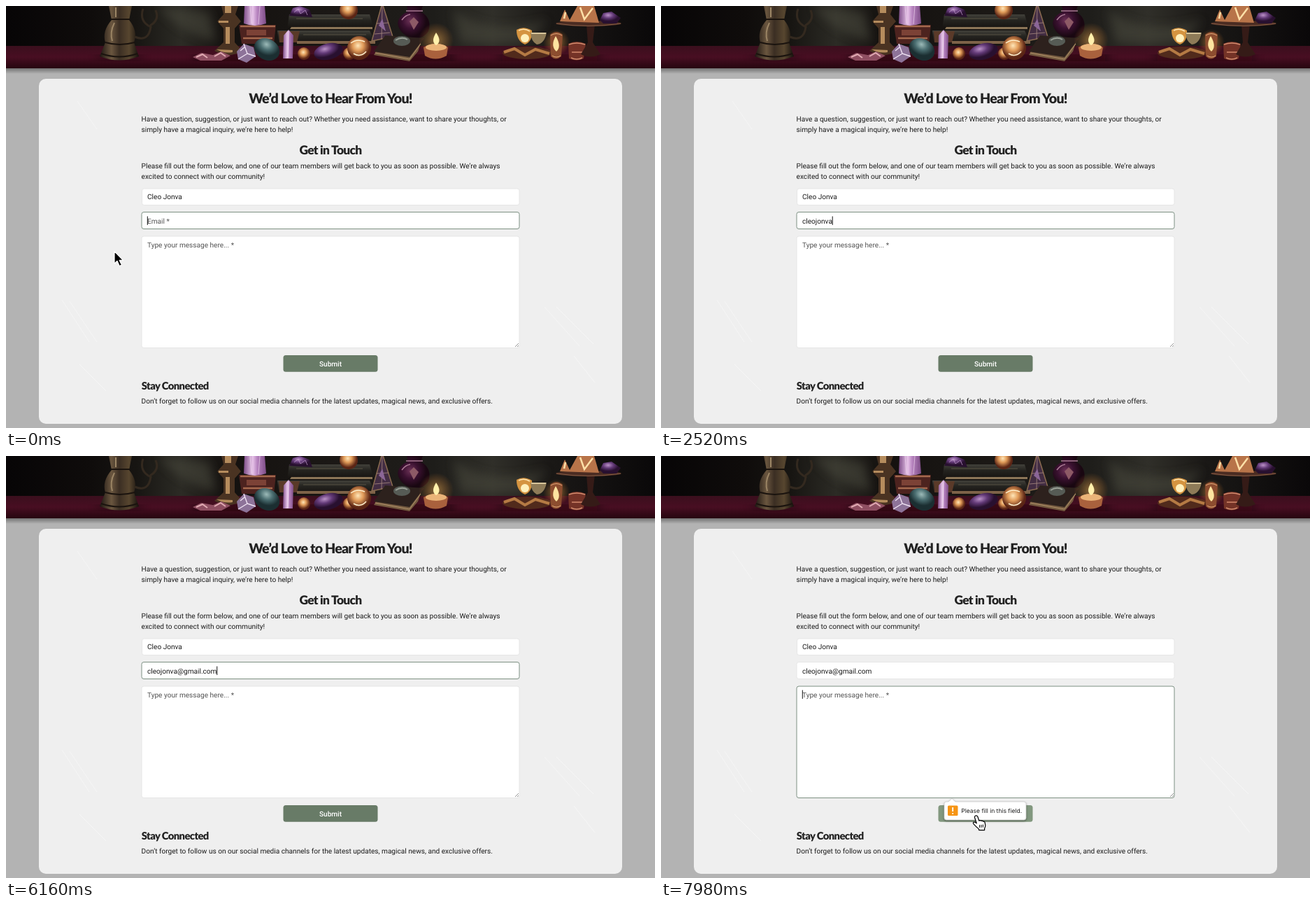
An HTML page for the animation above (8 s loop, 928x603 px).

```html
<!DOCTYPE html>
<html lang="en">
<head>
<meta charset="utf-8">
<title>Contact form</title>
<style>
  html, body { margin: 0; width: 100%; height: 100%; overflow: hidden; background: #b3b3b3; }
  svg { display: block; width: 100vw; height: 100vh; }
  text { font: 10.1px Roboto, sans-serif; fill: #1c1c1c; text-rendering: geometricPrecision; white-space: pre; }
  .head { font-family: Lato, sans-serif; font-weight: 900; letter-spacing: -.04em; fill: #222; }
  .mid { text-anchor: middle; }
  .hint { fill: #555; }
  .field { fill: #fff; stroke: #e6e6e6; stroke-width: 1; }
  .field.on { stroke: #7d9082; }
</style>
</head>
<body>
<svg viewBox="0 0 928 603" preserveAspectRatio="none">
  <defs>
    <linearGradient id="wall">
      <stop offset="0" stop-color="#070506"/><stop offset=".13" stop-color="#0f0c0b"/>
      <stop offset=".2" stop-color="#171512"/><stop offset=".27" stop-color="#2c2b25"/>
      <stop offset=".34" stop-color="#14110f"/><stop offset=".55" stop-color="#1d1a17"/>
      <stop offset=".66" stop-color="#1e1d1a"/><stop offset=".75" stop-color="#302f29"/>
      <stop offset=".84" stop-color="#1a1816"/><stop offset="1" stop-color="#0a0809"/>
    </linearGradient>
    <linearGradient id="table" x2="0" y2="1">
      <stop offset="0" stop-color="#3a0f1d"/><stop offset=".5" stop-color="#480e22"/><stop offset="1" stop-color="#26060f"/>
    </linearGradient>
    <linearGradient id="metal">
      <stop offset="0" stop-color="#1d1612"/><stop offset=".3" stop-color="#6a563f"/>
      <stop offset=".5" stop-color="#3b2e23"/><stop offset=".75" stop-color="#57462f"/><stop offset="1" stop-color="#15100d"/>
    </linearGradient>
    <linearGradient id="pink">
      <stop offset="0" stop-color="#7d4d88"/><stop offset=".4" stop-color="#e7c3e8"/>
      <stop offset=".6" stop-color="#b784bf"/><stop offset="1" stop-color="#7d4c86"/>
    </linearGradient>
    <linearGradient id="cover" x2="0" y2="1">
      <stop offset="0" stop-color="#42413a"/><stop offset=".4" stop-color="#252420"/><stop offset="1" stop-color="#15110f"/>
    </linearGradient>
    <radialGradient id="amber" cx=".45" cy=".4">
      <stop offset="0" stop-color="#ffe6b8"/><stop offset=".45" stop-color="#e09a58"/><stop offset="1" stop-color="#5b2515"/>
    </radialGradient>
    <radialGradient id="violet" cx=".4" cy=".3">
      <stop offset="0" stop-color="#bb92c8"/><stop offset=".5" stop-color="#633a78"/><stop offset="1" stop-color="#28102f"/>
    </radialGradient>
    <radialGradient id="teal" cx=".4" cy=".3">
      <stop offset="0" stop-color="#9cbab8"/><stop offset=".5" stop-color="#4a6d70"/><stop offset="1" stop-color="#1b2e31"/>
    </radialGradient>
    <radialGradient id="vase" cx=".4" cy=".45">
      <stop offset="0" stop-color="#6d3257"/><stop offset=".5" stop-color="#3a1130"/><stop offset="1" stop-color="#190711"/>
    </radialGradient>
    <radialGradient id="glow">
      <stop offset="0" stop-color="#ffbf60" stop-opacity=".5"/><stop offset="1" stop-color="#ff9030" stop-opacity="0"/>
    </radialGradient>
    <linearGradient id="shade" x2="0" y2="1">
      <stop offset="0" stop-color="#000" stop-opacity=".36"/><stop offset="1" stop-color="#000" stop-opacity="0"/>
    </linearGradient>
    <filter id="soft" x="-20%" y="-40%" width="140%" height="200%">
      <feDropShadow dx="0" dy="1.5" stdDeviation="1.8" flood-opacity=".4"/>
    </filter>
    <filter id="fold"><feGaussianBlur stdDeviation="7"/></filter>
    <filter id="haze"><feGaussianBlur stdDeviation=".55"/></filter>
    <clipPath id="crop"><rect width="928" height="89"/></clipPath>
  </defs>

  <rect width="928" height="603" fill="#b3b3b3"/>
  <rect y="89" width="928" height="8" fill="url(#shade)"/>

  <g id="banner" clip-path="url(#crop)">
    <rect width="928" height="57" fill="url(#wall)"/>
    <path d="M218 0Q245 38 300 50L290 10ZM640 5Q690 45 775 20L740 52H650Z" fill="#4a483d" opacity=".55" filter="url(#fold)"/>
    <rect y="57" width="928" height="32" fill="url(#table)"/>
    <path d="M270 78H640V70H270ZM705 76H850V70H705ZM130 74H195V70H130Z" fill="#12040a" opacity=".8" filter="url(#fold)"/>

    <g filter="url(#haze)">
      <!-- pitcher -->
      <path d="M184 44Q204 52 207 30Q190 22 196 4M206 28Q220 20 214 6" fill="none" stroke="#33291f" stroke-width="3"/>
      <path d="M147 0H180L176 20Q189 36 183 52L190 72Q162 83 134 72L142 52Q137 36 151 20Z" fill="url(#metal)"/>
      <path d="M150 19H177M142 52Q162 58 184 52M136 68Q162 77 188 68" stroke="#1a130e" stroke-width="2" fill="none"/>
      <path d="M155 24Q148 38 152 50M157 2V16" stroke="#9b8565" stroke-width="2" fill="none"/>

      <!-- candlestick, box and crystal -->
      <path d="M308 0H332L328 12L336 22L327 32V52L338 64Q318 76 298 64L311 52V32L302 22L311 12Z" fill="#4a3322"/>
      <path d="M313 0H322V10H313ZM314 30H320V54H314ZM304 21H318V24H304ZM301 62Q312 68 324 66V63Z" fill="#b58c5d"/>
      <path d="M333 27H386L383 54H337Z" fill="#4d231f"/>
      <path d="M335 29H385M339 46H381" stroke="#a5694e" stroke-width="2.5"/>
      <path d="M344 34H372V42H344Z" fill="#7c4236"/>
      <path d="M341 0H370L372 25Q356 31 340 25Z" fill="url(#pink)"/>
      <path d="M349 0L351 25M363 0L361 26" stroke="#f5def3" opacity=".6"/>

      <!-- books -->
      <path d="M405 12H520L526 33H402Z" fill="url(#cover)"/>
      <path d="M408 30H524V33H406Z" fill="#8b7557"/>
      <path d="M388 35H520L529 55H390Z" fill="url(#cover)"/>
      <path d="M390 36H420L416 52H391Z" fill="#5a3a29"/>
      <path d="M416 50H528V54H416Z" fill="#7d6248"/>
      <path d="M415 18H510M425 41H515" stroke="#6d6450" opacity=".7"/>
      <path d="M405 14L410 3L420 0L434 5L438 16Z" fill="url(#violet)"/>
      <path d="M412 9L418 4L421 11L428 6L431 13" stroke="#c8a2d2" fill="none" opacity=".7"/>
      <circle cx="490" cy="6" r="13" fill="url(#amber)"/>

      <!-- pyramid and vase -->
      <path d="M538 -4L553 44L523 50Z" fill="#432d43" stroke="#8b6c50" stroke-width="1.5"/>
      <path d="M538 0L537 47M530 25L547 24M527 40L549 38" stroke="#a98a80" stroke-width=".8"/>
      <path d="M533 28L538 18L543 36Z" fill="#8b6697"/>
      <path d="M573 0H596L593 8Q610 18 604 36Q598 47 582 46Q562 41 560 24Q562 13 575 8Z" fill="url(#vase)"/>
      <path d="M572 7H596M566 20Q571 13 578 12" stroke="#a97893" stroke-width="1.6" fill="none"/>
      <path d="M577 22L583 16L590 23L583 34Z" fill="#8d5a66"/>

      <!-- gems -->
      <path d="M267 73L279 67L296 70L308 65L321 71L308 78H278Z" fill="#8f4f62"/>
      <path d="M272 73L281 69L288 74M298 72L307 67L314 72" stroke="#e1abb3" stroke-width="2" fill="none"/>
      <path d="M330 65L340 54L354 59L357 72L344 81L332 76Z" fill="#8d7399"/>
      <path d="M340 54L345 68L357 72M345 68L332 76M335 64L341 59" stroke="#f0e3f3" fill="none" stroke-width="1.4"/>
      <ellipse cx="373" cy="62" rx="19" ry="15" transform="rotate(28 373 62)" fill="url(#teal)"/>
      <path d="M397 42L404 34L411 42L410 75H396Z" fill="url(#pink)"/>
      <path d="M404 36L403 74" stroke="#f5e3f2"/>
      <circle cx="426" cy="68" r="9" fill="url(#amber)"/>
      <ellipse cx="461" cy="65" rx="21" ry="11.5" transform="rotate(-13 461 65)" fill="url(#violet)"/>
      <circle cx="491" cy="68" r="9" fill="url(#amber)"/>
      <circle cx="505" cy="60" r="17" fill="url(#amber)"/>
      <path d="M493 53Q502 46 513 51M497 68Q507 74 515 65" stroke="#fff0ce" stroke-width="1.5" fill="none"/>

      <!-- open book and candle -->
      <path d="M541 43L595 47L589 65L577 79L526 70Z" fill="#745a40"/>
      <path d="M542 42L598 46L577 73L526 65Z" fill="#2d211d"/>
      <path d="M528 67L577 76L593 54" stroke="#b4956c" fill="none"/>
      <ellipse cx="566" cy="50" rx="12" ry="7" fill="#565b55"/>
      <path d="M557 49Q566 43 574 48" stroke="#9aa096" stroke-width="2" fill="none"/>
      <circle cx="615" cy="49" r="25" fill="url(#glow)"/>
      <path d="M597 59Q615 49 632 59L630 71Q614 80 599 71Z" fill="#a9613d"/>
      <ellipse cx="615" cy="59" rx="15" ry="5" fill="#eab478"/>
      <path d="M615 38Q624 51 615 56Q607 51 615 38Z" fill="#fff0ac"/>

      <!-- tray, glasses and stand -->
      <ellipse cx="745" cy="67" rx="35" ry="9" fill="#512a1c"/>
      <path d="M712 66L727 61L742 70L757 62L777 68" stroke="#b57a44" stroke-width="4" fill="none"/>
      <path d="M730 34Q740 28 752 35Q753 51 742 55Q730 50 730 34Z" fill="#d59440"/>
      <circle cx="742" cy="46" r="6" fill="#fff0bb"/>
      <path d="M733 35Q741 31 749 36" stroke="#ffe5b0" stroke-width="1.5" fill="none"/>
      <path d="M750 38H773Q770 54 759 55Q751 51 750 38Z" fill="#8e7b58"/>
      <path d="M751 39H772" stroke="#d8c59a" stroke-width="2"/>
      <circle cx="787" cy="52" r="19" fill="url(#glow)"/>
      <path d="M778 41Q787 33 796 41L794 72Q786 79 779 72Z" fill="#8c4d2f"/>
      <path d="M779 42Q787 37 795 42M781 71Q787 75 793 71" stroke="#e1a878" fill="none"/>
      <path d="M786 43Q795 58 787 65Q778 57 786 43Z" fill="#ffe4a0"/>
      <path d="M804 54Q816 48 829 54L826 75Q816 80 805 75Z" fill="#743327"/>
      <path d="M805 55Q816 51 828 55M809 66H824M808 74Q816 78 824 74" stroke="#d28b6e" stroke-width="1.6" fill="none"/>
      <path d="M830 26H842L839 52L850 69Q835 76 822 69L832 52Z" fill="#351b17"/>
      <ellipse cx="833" cy="25" rx="47" ry="4" fill="#4b2c22"/>
      <path d="M787 25Q833 32 879 25" stroke="#875d45" fill="none"/>
      <path d="M792 22L799 5L806 20L817 0H841L848 24Z" fill="#b87449"/>
      <path d="M821 2L827 19L839 3M798 18L800 9" stroke="#ffe0a8" stroke-width="2.5" fill="none"/>
      <path d="M849 20L854 10L866 8L879 17L873 25H854Z" fill="url(#violet)"/>
    </g>
  </g>

  <rect x="47" y="104" width="834" height="493" rx="10" fill="#efefef"/>
  <path d="M102 136L130 176M80 420L119 480M91 422L130 480M105 512L143 550M770 430L820 486M787 430L840 483M812 500L842 538"
    fill="none" stroke="#f6f6f6"/>

  <text class="head mid" x="464" y="139" style="font-size:19.6px">We’d Love to Hear From You!</text>
  <text x="193.6" y="164.7">Have a question, suggestion, or just want to reach out? Whether you need assistance, want to share your thoughts, or</text>
  <text x="193.6" y="180">simply have a magical inquiry, we’re here to help!</text>
  <text class="head mid" x="464" y="211.5" style="font-size:17.4px">Get in Touch</text>
  <text x="193.6" y="231.7">Please fill out the form below, and one of our team members will get back to you as soon as possible. We’re always</text>
  <text x="193.6" y="247">excited to connect with our community!</text>

  <rect class="field" x="194.5" y="261" width="539.5" height="23.5" rx="3"/>
  <text x="202" y="276.4">Cleo Jonva</text>
  <rect class="field" id="mailBox" x="194" y="294.5" width="540" height="24" rx="3"/>
  <text class="hint" id="mailHint" x="202" y="310.5">Email *</text>
  <text id="mail" x="202" y="310.5"></text>
  <rect class="field" id="noteBox" x="194" y="329" width="540" height="159.5" rx="3"/>
  <text class="hint" x="202" y="344.6">Type your message here... *</text>
  <path d="M728 487L733 482M731 487L733 485" stroke="#777" stroke-width=".8"/>
  <rect id="caret" width="1" height="12.4" fill="#111"/>

  <rect id="button" x="396.5" y="499" width="135" height="23.7" rx="3.5"/>
  <text class="mid" x="464" y="514.7" style="fill:#fff;font-weight:500">Submit</text>

  <text class="head" x="193.8" y="547.7" style="font-size:14.8px">Stay Connected</text>
  <text x="193.6" y="567.7">Don’t forget to follow us on our social media channels for the latest updates, magical news, and exclusive offers.</text>

  <g id="tip">
    <path d="M408 494H411L416 489.5L421 494H519Q522 494 522 497V517Q522 520 519 520H408Q405 520 405 517V497Q405 494 408 494Z"
      fill="#fff" stroke="#bcbcbc" stroke-width=".6" filter="url(#soft)"/>
    <rect x="410" y="499.5" width="14.5" height="14.5" rx="1.5" fill="#f69515"/>
    <path d="M417.2 502V508M417.2 510V511.8" stroke="#fff" stroke-width="1.8"/>
    <text x="429.3" y="510" style="font:8.5px Inter,sans-serif">Please fill in this field.</text>
  </g>

  <g id="pointer" stroke-linejoin="round">
    <path id="arrow" d="M0 0V17.6L4 13.8L7.2 21L10.4 19.6L7.2 12.8H12.5Z" fill="#000" stroke="#fff" stroke-width="1.2"/>
    <g id="hand" fill="#fff" stroke="#000" stroke-width="1.2">
      <path d="M-3.4 2.6Q-3.4 .6-1.6 .3T1 1.6L3 7.6Q4.6 6.2 6 7.8Q7.6 6.8 8.8 8.6Q10.4 8 11.3 10L12 14Q12 17 10.8 18.6V21H2.8V19.5Q-1 16.5-5 12Q-6 10-4.2 9.4Q-2.4 9.6-.6 11.2Z"/>
      <path d="M3.8 13.5V17.5M6.2 13.3V17.3M8.6 13V17" stroke-width="1"/>
    </g>
  </g>
</svg>
<script>
const LOOP = 8000, STEP = 70, CLICK = 7490;
const MAIL = 'cleojonva@gmail.com';
// one time per typed character
const KEYS = [280, 560, 770, 1050, 1540, 1890, 2100, 2380, 2450, 3500,
              3990, 4410, 4690, 4830, 5110, 5320, 5600, 5740, 5810];
// pointer stops: time, x, y
const PATH = [[6510, 155, 350.5], [7140, 448.8, 515], [7280, 448.8, 515], [7420, 451.8, 513.6]];

const el = id => document.getElementById(id);
const [mail, mailHint, mailBox, noteBox, caret, button, tip, pointer, arrow, hand] =
  ['mail', 'mailHint', 'mailBox', 'noteBox', 'caret', 'button', 'tip', 'pointer', 'arrow', 'hand'].map(el);
const clamp = v => Math.min(1, Math.max(0, v));
const ease = v => v * v * (3 - 2 * v);
const show = (node, on) => { node.style.visibility = on ? 'visible' : 'hidden'; };

function pointerAt(t) {
  let [, x, y] = PATH[0];
  for (let i = 1; i < PATH.length; i++) {
    const [t0, x0, y0] = PATH[i - 1], [t1, x1, y1] = PATH[i];
    if (t < t0) break;
    const k = ease(clamp((t - t0) / (t1 - t0)));
    x = x0 + (x1 - x0) * k;
    y = y0 + (y1 - y0) * k;
  }
  return [x, y];
}

function draw(now) {
  const t = Math.floor(now % LOOP / STEP) * STEP;
  const count = KEYS.filter(k => k <= t).length;
  const clicked = t >= CLICK;

  mail.textContent = MAIL.slice(0, count);
  show(mailHint, !count);
  mailBox.classList.toggle('on', !clicked);
  noteBox.classList.toggle('on', clicked);

  const since = t - (clicked ? CLICK : count ? KEYS[count - 1] : 0);
  const width = clicked || !count ? 0 : mail.getComputedTextLength();
  caret.setAttribute('x', 201.8 + width);
  caret.setAttribute('y', clicked ? 334.5 : 300.5);
  show(caret, since % 1000 < 500);

  const [x, y] = pointerAt(t);
  const over = x > 396 && x < 532 && y > 499 && y < 523;
  pointer.setAttribute('transform', `translate(${x} ${y})`);
  show(arrow, !over && (t < KEYS[0] || t >= PATH[0][0]));
  show(hand, over);
  button.setAttribute('fill', over ? '#82987f' : '#687b67');
  tip.style.opacity = clamp((t - CLICK) / 140);
}

const start = performance.now();
function tick() {
  draw(performance.now() - start);
  requestAnimationFrame(tick);
}
tick();
</script>
</body>
</html>
```
